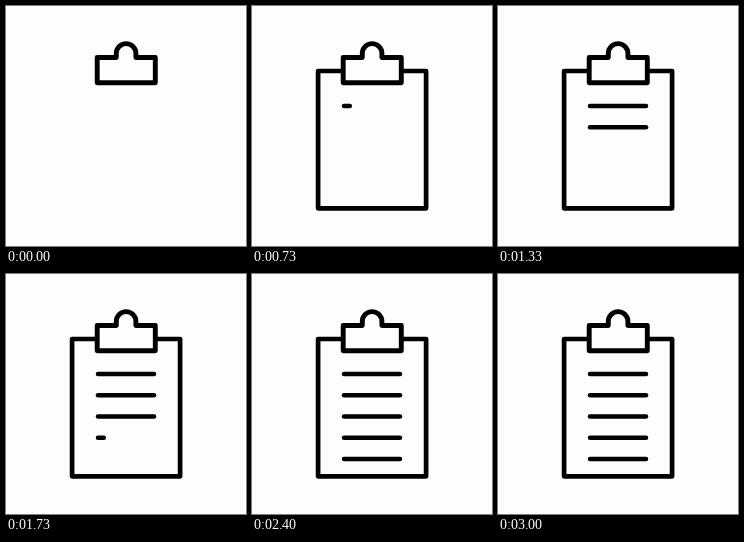
Animation, 240 px wide and 240 px high, one loop 3.07 s. Source, as an HTML page:

```html
<!DOCTYPE html>
<html lang="en">
<head>
<meta charset="utf-8">
<title>Clipboard</title>
<style>
  html, body { margin: 0; width: 100%; height: 100%; overflow: hidden; background: #fdfdfe; }
  svg { display: block; width: 100%; height: 100%; }
</style>
</head>
<body>
<svg viewBox="0 0 240 240" fill="none" stroke="#000" stroke-width="4.7" stroke-linecap="round" stroke-linejoin="round">
  <rect id="board" x="66.1" y="65" width="108" height="137.3"/>
  <path fill="#fdfdfe" stroke-width="4.9" d="M91.2 51.5H110.3V47.4A9.8 9.8 0 0 1 129.9 47.4V51.5H149.3V76.7H91.2Z"/>
  <g id="lines" stroke-width="4.5"></g>
</svg>
<script>
const LOOP = 3070, STEP = 200 / 3;
const BOARD_TIME = 500, LINES_START = 10 * STEP, LINE_TIME = 5 * STEP;
const LEFT = 92, WIDTH = 56, FIRST_Y = 100, GAP = 21.25;

const board = document.getElementById('board');
const group = document.getElementById('lines');
const lines = Array.from({ length: 5 }, () =>
  group.appendChild(document.createElementNS('http://www.w3.org/2000/svg', 'path')));

function ease(start, duration, t) {
  const u = Math.min(1, Math.max(0, (t - start) / duration));
  return u * u * (3 - 2 * u);
}

function draw(ms) {
  // The motion advances at 15 pictures per second.
  const t = Math.floor((ms % LOOP + 3.34) / STEP) * STEP;

  // The sheet unrolls downwards from behind the clip.
  const grown = ease(0, BOARD_TIME, t);
  board.setAttribute('transform', `translate(0 65) scale(1 ${grown}) translate(0 -65)`);
  board.setAttribute('visibility', grown > 0 ? 'visible' : 'hidden');

  lines.forEach((line, i) => {
    const drawn = ease(LINES_START + i * LINE_TIME, LINE_TIME, t);
    line.setAttribute('d', drawn > 0.001 ? `M${LEFT} ${FIRST_Y + i * GAP}h${WIDTH * drawn}` : '');
  });
}

const begin = performance.now();
function tick() {
  draw(performance.now() - begin);
  requestAnimationFrame(tick);
}
tick();
</script>
</body>
</html>
```
